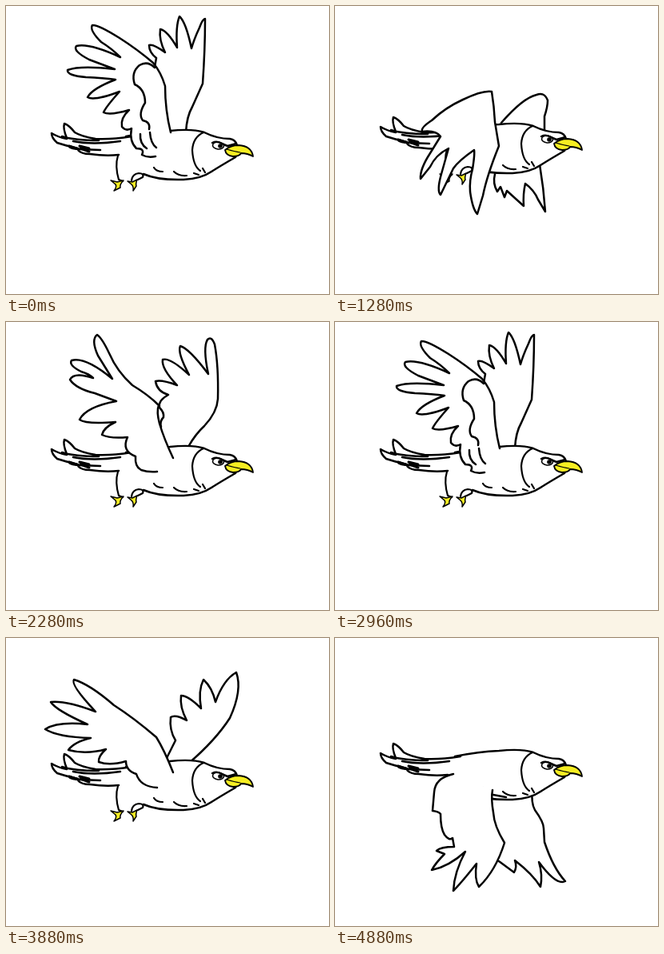
Recreate the animation shown at these times as an HTML page with a canvas. Size 404 by 360 pixels, loop 4960 ms.

```html
<!DOCTYPE html>
<html>
<head>
<meta charset="utf-8">
<title>Flying bird</title>
<style>
html, body { margin: 0; overflow: hidden; background: #fff; }
canvas { display: block; }
</style>
</head>
<body>
<canvas id="stage" width="404" height="360"></canvas>
<script>
const ctx = document.getElementById('stage').getContext('2d');
const LOOP = 4960, TICK = 40, DRAWINGS = 60;
const YELLOW = '#f6ee22';

const body = `M150 163Q180 157 205 156Q233 153 248 158Q264 166 280 166Q287 167 289 174
  L287 189Q268 200 257 207Q244 216 222 217Q190 218 172 210`;
const tail = `M157 163Q132 167 112 166Q94 163 86 158Q79 149 73 147Q71 153 76 165
  M76 166Q65 164 57 159Q57 165 64 171Q76 175 90 178
  M70 163Q86 168 116 168M84 169Q108 174 143 169
  M78 175Q82 179 93 179L118 180M90 180Q94 185 105 185Q125 188 141 186`;
const tailShade = 'M79 175L88 178M93 178L104 182M92 175L104 178';
const markings = `M247 158Q234 164 233 180Q234 200 243 206M185 202Q188 207 196 207
  M210 207Q216 213 226 212M235 209L241 211M246 203L249 208
  M140 187Q136 200 141 217L146 219M157 218Q158 210 166 209Q173 209 171 214L165 217`;
const feet = `M131 218L139 220L147 218Q142 223 143 227L135 231Q139 226 137 223Z
  M152 219L158 220L164 217Q162 222 163 225L159 231Q160 226 157 223Z`;
const beak = `M274 180Q281 174 291 174Q307 175 309 188Q302 184 294 184Q292 188 284 188
  Q275 187 274 180Z`;
const beakLine = 'M276 179Q286 182 293 183';
const brow = 'M258 171Q264 168 270 172L277 175L288 172';

// One wing beat: body lift, far wing, near wing, loose inner lines.
const beat = [
  { dy: 0,
    far: `M225 158Q226 138 233 126L246 97Q249 55 249 16Q246 16 242 27Q235 42 232 53
      Q225 20 217 13Q212 25 214 52Q202 31 193 29Q191 42 199 58Q184 47 179 49
      Q179 58 188 65L186 76`,
    near: `M206 158Q199 130 199 100Q194 83 184 71Q164 54 142 40Q115 23 108 24Q104 30 119 45
      Q132 53 143 64Q104 46 88 50Q83 56 104 67L136 79Q93 74 77 80Q76 87 100 89Q122 90 137 92
      Q108 103 102 114Q110 119 142 107Q125 126 122 133Q130 137 154 130Q143 140 145 151
      Q150 157 157 153Q154 169 163 178Q174 178 170 186Q177 190 187 188`,
    inner: `M186 77Q177 68 167 74Q156 83 161 98Q174 104 174 121Q165 135 171 143Q181 145 179 154
      M168 160Q167 172 176 178M180 158Q181 172 188 177` },
  { dy: 0,
    far: `M228 156Q237 140 248 130Q264 113 265 96Q266 55 261 28Q257 17 252 22Q246 32 253 65
      Q229 33 218 30Q214 38 229 66Q205 44 196 47Q194 58 214 79Q195 72 187 74Q189 87 203 91
      Q190 98 192 107Q198 113 197 119Q192 124 194 131`,
    near: `M209 170Q198 147 192 127Q188 112 191 104Q178 91 158 79Q139 62 129 39Q120 20 114 16
      Q106 22 115 42L133 71Q99 43 82 48Q78 54 94 62Q104 65 109 70Q85 62 80 72Q87 83 111 89
      L138 99Q100 106 92 122Q100 128 137 125Q122 132 120 141Q130 146 152 144Q144 161 162 168
      Q161 181 169 185Q178 188 189 187`,
    inner: '' },
  { dy: -2,
    far: `M228 157Q262 128 280 100Q296 65 288 43Q272 52 262 80Q258 62 247 52Q240 66 244 88
      Q228 72 219 72Q217 86 226 103Q212 95 206 99Q204 115 212 128L200 152`,
    near: `M209 168Q198 140 188 124Q160 100 135 84Q105 58 85 52Q80 58 112 92Q75 78 56 80
      Q62 90 102 108Q65 104 49 114Q65 124 106 125Q85 130 78 140Q100 146 125 139
      Q115 148 116 155Q130 160 150 154Q150 166 163 170Q168 186 189 187`,
    inner: '' },
  { dy: -6,
    far: `M222 151Q252 124 290 122Q318 126 329 139Q311 140 299 145Q318 153 323 165
      Q300 160 283 165L250 170`,
    near: `M208 160Q195 140 170 132Q120 117 75 130Q55 136 48 151Q72 147 100 156
      Q70 160 52 178Q80 171 106 174Q82 184 72 202Q100 190 120 188Q106 200 102 214
      Q128 204 142 194Q140 204 144 210Q160 204 168 190Q180 191 192 184`,
    inner: '' },
  { dy: -11,
    far: `M240 190Q262 200 276 225Q295 255 300 282Q282 270 270 250Q274 275 270 294
      Q254 275 246 252Q242 270 236 280Q226 260 224 245Q216 255 212 256Q204 235 204 200`,
    near: `M170 160Q145 156 130 164Q108 180 97 208Q84 235 84 262Q98 247 112 232
      Q102 262 108 286Q122 262 136 240Q134 270 146 297Q157 265 164 238Q168 256 180 270
      Q192 240 196 220Q197 205 198 188`,
    inner: '' },
  { dy: -15,
    far: `M247 190Q245 206 250 215Q261 230 261 238L262 255Q273 288 288 304Q277 310 255 280
      Q260 296 257 311Q247 295 225 278Q228 286 224 293L205 279`,
    near: `M148 170Q125 175 124 193L122 216Q130 217 132 220Q132 238 137 246Q143 254 147 250
      L149 261Q132 261 127 266L137 270Q126 281 121 290Q142 286 163 267Q149 293 148 316
      Q158 306 177 282Q174 302 180 311Q201 291 212 256Q199 235 198 218Q195 201 197 190`,
    inner: 'M198 196L214 199' },
  { dy: -12,
    far: `M214 142Q232 130 248 134Q256 140 255 150M202 200Q202 235 210 260L218 250
      Q226 268 232 280Q236 264 236 250Q252 276 274 288Q268 262 260 236L252 185`,
    near: `M118 180Q134 158 160 144Q184 134 197 140Q201 160 203 190Q207 220 204 245
      Q196 278 184 302Q174 278 175 240Q154 265 142 290Q136 260 146 224Q126 246 114 268
      Q112 240 130 210Q120 218 110 228Q108 202 118 180Z`,
    inner: '' },
  { dy: -8,
    far: `M208 146Q235 115 252 111Q262 107 266 118Q266 126 262 138L262 158
      M200 210Q197 222 203 232L207 226L212 239L215 231L236 250Q235 235 238 222
      Q249 230 254 242L263 257Q261 228 256 198`,
    near: `M132 163Q126 155 109 157Q107 152 121 143Q138 127 160 117Q185 105 196 107
      Q199 125 200 145L205 175Q190 212 185 237L178 260Q172 254 169 232Q168 218 172 204
      Q175 185 174 180Q155 193 148 203L132 236Q127 231 133 210L142 178Q126 186 119 201
      L107 216Q106 204 119 184Z`,
    inner: '' },
  { dy: -3,
    far: `M226 156Q232 130 250 100Q262 70 252 52Q236 53 218 66Q202 76 192 92Q208 88 218 92
      Q204 102 200 118Q211 112 218 116Q208 126 206 142`,
    near: `M207 162Q201 120 196 92Q186 66 165 62Q130 64 100 80Q78 95 70 112Q100 100 125 104
      Q95 118 82 140Q110 126 130 128Q112 142 108 160Q128 146 142 148Q138 162 144 172
      Q156 164 160 166Q166 184 188 185`,
    inner: '' }
];

function ink(path, { fill, width = 2.5 } = {}) {
  const shape = new Path2D(path);
  if (fill) {
    ctx.fillStyle = fill;
    ctx.fill(shape);
  }
  ctx.lineWidth = width;
  ctx.stroke(shape);
}

function drawEye() {
  ctx.lineWidth = 1.6;
  ctx.beginPath();
  ctx.ellipse(265.5, 174.5, 7, 4.5, 0.1, 0, 7);
  ctx.stroke();
  ctx.fillStyle = '#000';
  ctx.beginPath();
  ctx.arc(268, 175, 2.8, 0, 7);
  ctx.fill();
}

function drawBody(dy) {
  ctx.save();
  ctx.translate(0, dy);
  ink(body, { fill: '#fff' });
  ink(tail);
  ink(tailShade, { width: 3 });
  ink(markings, { width: 2.2 });
  ink(feet, { fill: YELLOW, width: 1.5 });
  ink(beak, { fill: YELLOW, width: 1.8 });
  ink(beakLine, { width: 1.2 });
  drawEye();
  ink(brow);
  ctx.restore();
}

function drawPose({ dy, far, near, inner }) {
  ctx.clearRect(0, 0, 404, 360);
  ctx.strokeStyle = '#000';
  ctx.lineCap = ctx.lineJoin = 'round';
  ink(far, { fill: '#fff' });
  drawBody(dy);
  ink(near, { fill: '#fff' });
  ink(inner);
}

// Drawings last two ticks; every 12.5 of them one is held a tick longer.
const startOf = k => TICK * (2 * k - 1 + Math.floor((k + 7) / 12.5));

function drawingAt(time) {
  let k = 0;
  while (k + 1 < DRAWINGS && startOf(k + 1) <= time) k++;
  return k;
}

const origin = performance.now();
function frame() {
  const time = (performance.now() - origin) % LOOP;
  drawPose(beat[drawingAt(time) % beat.length]);
  requestAnimationFrame(frame);
}
frame();
</script>
</body>
</html>
```
